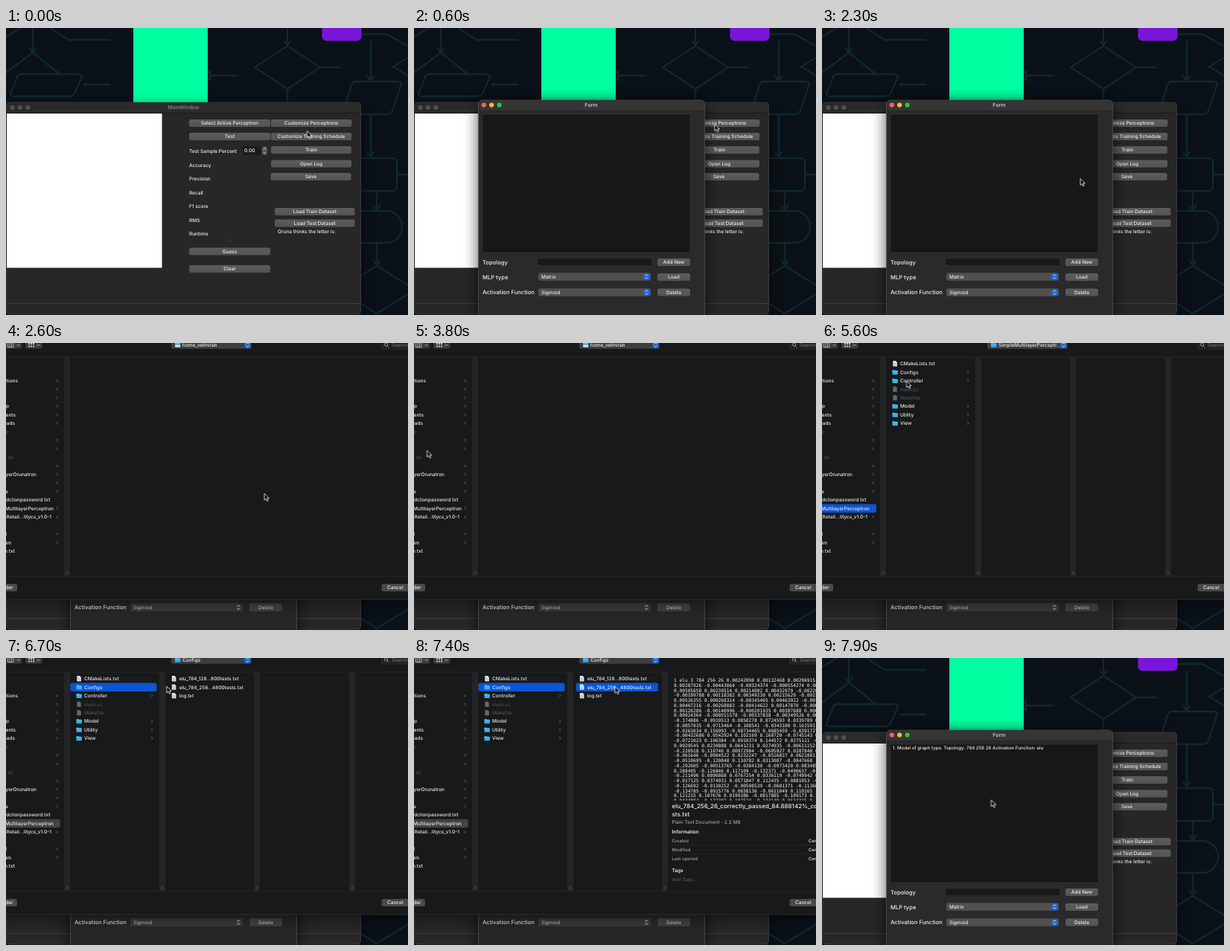
Write an HTML page that moves like this. It is 540 px wide and 386 px high and loops after 8 s.

```html
<!DOCTYPE html>
<html lang="en">
<head>
<meta charset="utf-8">
<title>Perceptron window</title>
<style>
html, body { margin: 0; width: 100%; height: 100%; overflow: hidden; background: #0a1118; }
svg { display: block; width: 540px; height: 386px; }
text { font-family: Inter, "Open Sans", sans-serif; font-weight: 500; text-rendering: geometricPrecision; white-space: pre; }
.mono { font-family: "DejaVu Sans Mono", monospace; font-weight: 400; }
.bold { font-weight: 600; }
.t { animation: 8s step-end infinite; }
#form { animation-name: form; }
#model { animation-name: model; }
#dialog { animation-name: dialog; }
.home { animation-name: home; }
.project { animation-name: project; }
.inside { animation-name: inside; }
.configs { animation-name: configs; }
.picked { animation-name: picked; }
.preview { animation-name: preview; }
.spare { animation-name: spare; }
@keyframes form { 0% { opacity: 0 } 4.375%, to { opacity: 1 } }
@keyframes model { 0% { opacity: 0 } 95.625%, to { opacity: 1 } }
@keyframes dialog { 0% { opacity: 0 } 30.625% { opacity: 1 } 95.625%, to { opacity: 0 } }
@keyframes home { 0% { opacity: 1 } 60%, to { opacity: 0 } }
@keyframes project { 0% { opacity: 0 } 60% { opacity: 1 } 73.75%, to { opacity: 0 } }
@keyframes inside { 0% { opacity: 0 } 60%, to { opacity: 1 } }
@keyframes configs { 0% { opacity: 0 } 73.75%, to { opacity: 1 } }
@keyframes picked { 0% { opacity: 0 } 89.375%, to { opacity: 1 } }
@keyframes preview { 0% { opacity: 0 } 91.25%, to { opacity: 1 } }
@keyframes spare { 0% { opacity: 0 } 60% { opacity: 1 } 91.25%, to { opacity: 0 } }
#cursor { animation: move 8s ease-in-out infinite; }
@keyframes move {
  0% { transform: translate(404.5px, 138.5px) }
  3.5%, 8.5% { transform: translate(404px, 129.5px) }
  11.25% { transform: translate(362px, 290px) }
  13.75%, 18.75% { transform: translate(344px, 331px) }
  24.5%, 33.75% { transform: translate(347px, 202.5px) }
  43.75% { transform: translate(20px, 90px) }
  47%, 48% { transform: translate(17.5px, 144.5px) }
  52.5% { transform: translate(8px, 185px) }
  56% { transform: translate(14px, 209px) }
  58.75%, 63% { transform: translate(16px, 217px) }
  70% { transform: translate(113.5px, 51px) }
  72.5%, 78.5% { transform: translate(118px, 37px) }
  87.5%, 93.5% { transform: translate(270px, 38.5px) }
  97.5%, to { transform: translate(227.3px, 190.8px) }
}
</style>
</head>
<body>
<svg viewBox="0 0 540 386">
  <defs>
    <filter id="blur" x="-20%" y="-20%" width="140%" height="140%"><feGaussianBlur stdDeviation="10"/></filter>
    <linearGradient id="face" x2="0" y2="1">
      <stop stop-color="#5c5c5c"/><stop offset="1" stop-color="#545454"/>
    </linearGradient>
    <clipPath id="numbers"><rect x="341" y="20" width="199" height="171.5"/></clipPath>
  </defs>

  <rect width="540" height="386" fill="#0a1118"/>
  <g fill="none" stroke="#11282c" stroke-width="2.3">
    <path d="M36 0V32M31 26L36 33L41 26M21 62H97Q104 62 101 68L92 88Q90 92 84 92H10Q4 92 7 86L15 66Q17 62 21 62Z"/>
    <path d="M36 33L72 62M36 33L0 60M0 12L20 0M104 76H140M60 0L84 16H140"/>
    <path d="M266 0V40M258 58L266 64L274 58V70L266 64L258 70ZM266 70V100M230 64H258M274 64H310"/>
    <path d="M378 0V22M373 17L378 23L383 17M378 24L422 53L378 82L334 53ZM378 82V100M422 53H450"/>
    <path d="M490 17V70M485 64L490 71L495 64M470 72H526Q532 72 530 78L519 111Q517 116 511 116H458Q451 116 454 110L464 77Q466 72 470 72Z"/>
    <path d="M477 8H510L540 24M540 40L520 52L540 64M490 116V172M485 166L490 173L495 166"/>
    <rect x="460" y="175" width="65" height="44" rx="5"/>
    <path d="M498 219V244M493 238L498 245L503 238M525 197H540"/>
    <rect x="450" y="246" width="82" height="43" rx="21"/>
    <path d="M498 289V318M493 312L498 319L503 312M498 320L550 352L498 384L446 352Z"/>
  </g>
  <rect x="171" y="0" width="100" height="100" fill="#00ffa0"/>
  <rect x="424.5" y="-20" width="53" height="37.3" rx="6" fill="#7a16dc"/>

  <g id="main"></g>
  <g id="form" class="t"></g>
  <g id="dialog" class="t"></g>
  <path id="cursor" d="M0 0V8.8L2.1 7L3.6 10.2L5.1 9.5L3.7 6.4H6.4Z" fill="#050505" stroke="#fff" stroke-width=".8" stroke-linejoin="round"/>
</svg>

<script>
const $ = id => document.getElementById(id);
const rect = (x, y, w, h, fill, rx = 0, more = '') =>
  `<rect x="${x}" y="${y}" width="${w}" height="${h}" rx="${rx}" fill="${fill}" ${more}/>`;
const shadow = (x, y, w, h, alpha) => rect(x, y + 4, w, h, '#000', 5, `opacity="${alpha}" filter="url(#blur)"`);
const line = (d, color, w = 1) => `<path d="${d}" fill="none" stroke="${color}" stroke-width="${w}"/>`;
// y is the vertical middle of the capitals
const text = (s, x, y, size = 6.5, fill = '#f0f0f0', more = '') =>
  `<text x="${x}" y="${y + size * .36}" font-size="${size}" fill="${fill}" ${more}>${s}</text>`;
const mid = 'text-anchor="middle"', end = 'text-anchor="end"', bold = 'class="bold"';
const group = (cls, inner) => `<g class="t ${cls}">${inner}</g>`;
const button = (s, x, y, w, fill = 'url(#face)', color = '#f0f0f0') =>
  rect(x, y - 5, w, 10, fill, 2.5) + text(s, x + w / 2, y, 6.5, color, mid);
const lights = (x, y, colors) =>
  colors.map((c, i) => `<circle cx="${x + i * 10.4}" cy="${y}" r="3.1" fill="${c}"/>`).join('');
const arrows = (x, y, fill) => rect(x, y - 4.3, 8.6, 8.6, fill, 2) +
  line(`M${x + 2.5} ${y - 1}l1.8 -1.9l1.8 1.9M${x + 2.5} ${y + 1}l1.8 1.9l1.8 -1.9`, '#f4f4f4', .9);

function drawMain() {
  const labels = ['Accuracy', 'Precision', 'Recall', 'F1 score', 'RMS', 'Runtime'];
  const buttons = [
    ['Select Active Perceptron', 246, 128, 109], ['Customize Perceptrons', 355.8, 128, 108.5],
    ['Test', 246, 146, 109], ['Customize Training Schedule', 355.8, 146, 108.5],
    ['Train', 356, 164, 108], ['Open Log', 356, 182.5, 108], ['Save', 355.5, 200, 108],
    ['Load Train Dataset', 361, 247, 107.5], ['Load Test Dataset', 361, 262.5, 107.5],
    ['Guess', 246, 300.5, 109], ['Clear', 246, 324, 109]
  ];
  $('main').innerHTML = shadow(1, 100, 475.5, 285, .35) +
    rect(1, 100, 475.5, 285, '#272727', 4, 'stroke="#48494a" stroke-width=".7"') +
    rect(1.4, 100.4, 474.7, 14, '#2b2b2c', 4) + line('M1 114.5H476', '#161616', .8) +
    lights(8.5, 107, ['#505052', '#505052', '#505052']) +
    text('MainWindow', 238.5, 107, 6.8, '#8c8c8c', mid) +
    rect(1, 115, 208.5, 207.5, '#fff') + line('M1 370.5H476', '#454545', .8) +
    buttons.map(b => button(...b)).join('') +
    text('Test Sample Percent', 246, 166) +
    labels.map((s, i) => text(s, 246, 184.6 + i * 18.45)).join('') +
    rect(318, 159.5, 24, 11, '#1b1b1b') + text('0.00', 320, 165, 6.6) +
    rect(344, 159, 6.8, 12, '#555', 3) +
    line('M345.7 163.4l1.7 -1.9l1.7 1.9M345.7 166.8l1.7 1.9l1.7 -1.9', '#eee', .8) +
    `<circle cx="300.5" cy="285.5" r="1.1" fill="#444"/>` +
    text('Oruna thinks the letter is:', 365, 273.5);
}

function drawForm() {
  const combo = (s, y) => rect(167, y - 5.2, 151, 10.4, '#505050', 2.5) +
    text(s, 171, y) + arrows(308, y, '#1667d8');
  $('form').innerHTML = shadow(86.5, 97, 304, 300, .7) +
    rect(86.5, 97, 304, 300, '#2a2a2a', 5, 'stroke="#5a5a5a" stroke-width=".7"') +
    rect(87, 97.4, 303, 14, '#353536', 5) + rect(87, 105, 303, 6.5, '#353536') +
    line('M87 111.3H390', '#1d1d1d', .7) +
    lights(93.8, 103.5, ['#ff5f57', '#febc2e', '#28c840']) +
    text('Form', 238, 103.5, 7, '#c6c6c6', mid + ' ' + bold) +
    rect(92, 116, 279, 186, '#171717', 0, 'stroke="#363636" stroke-width=".6"') +
    text('Topology', 92, 315, 7.6) + text('MLP type', 92, 335, 7.6) +
    text('Activation Function', 92, 355.5, 7.6) +
    rect(166, 310, 153.5, 9.5, '#191919', 0, 'stroke="#343434" stroke-width=".6"') +
    combo('Matrix', 334.5) + combo('Sigmoid', 355.5) +
    button('Add New', 327, 315, 44) + button('Load', 327, 335, 44) + button('Delete', 327, 355.5, 44) +
    `<g id="model" class="t">` +
    text('1. Model of graph type. Topology: 784 256 26 Activation Function: elu', 95, 121, 6.1) + '</g>';
}

const rowY = i => 27.8 + i * 11.45;
const DIM = '#505255', ICON = '#35aef0', PANEL = '#18191a';
const chevron = (x, i) => line(`M${x - .8} ${rowY(i) - 1.8}l1.7 1.8l-1.7 1.8`, '#77797c', .8);
const folder = (x, y) => rect(x, y - 3, 3.6, 2, ICON, .6) + rect(x, y - 2.2, 7.4, 5.4, ICON, .8) +
  line(`M${x} ${y - .9}h7.4`, '#7dd0fa', .6);
const file = (x, y, c = '#e4e4e4') =>
  `<path d="M${x + .8} ${y - 3.7}h3.8l1.8 1.8v5.5h-5.6z" fill="${c}"/>` +
  line(`M${x + 2} ${y - .6}h3M${x + 2} ${y + .9}h3M${x + 2} ${y + 2.3}h3`, '#8a8a8a', .4);
const pick = (x, i, w, fill = '#0b55d2') => rect(x, rowY(i) - 5.7, w, 11.4, fill, 2.5);
const bar = x => rect(x, 19.5, 8, 294, '#242525') +
  line(`M${x + 3.2} 307v4.5M${x + 5} 307v4.5`, '#5a5b5c', .6);

function homeList() {
  // end of the name, row, text, dimmed
  const names = [
    [16, 2, 'Applications'], [4, 5, 'Desktop'], [13, 6, 'Documents'], [12, 7, 'Downloads'],
    [4, 8, 'a.cc', 1], [10, 11, 'task.cc', 1], [41, 13, 'SimpleMultilayerOrunatron'], [3, 15, 'Pictures'],
    [59.5, 16, 'oldclionpassword.txt'], [64, 17, 'SimpleMultilayerPerceptron'],
    [61, 18, 'Retail...litycs_v1.0-1'], [1, 20, 'old'], [7, 21, 'vim'], [12, 22, 'main.txt']
  ];
  const dirs = [2, 3, 4, 5, 6, 7, 9, 10, 12, 13, 14, 15, 17, 18, 20, 21];
  return group('project', pick(-9, 17, 82)) + group('configs', pick(-9, 17, 82, '#414244')) +
    names.map(([x, i, s, dim]) => text(s, x, rowY(i), 6.5, dim ? DIM : '#ececec', end)).join('') +
    dirs.map(i => chevron(68.5, i)).join('');
}

function projectList() {
  const names = ['CMakeLists.txt', 'Configs', 'Controller', 'main.cc', 'Makefile', 'Model', 'Utility', 'View'];
  return group('configs', pick(86.5, 1, 116)) + names.map((s, i) => {
    const dim = i === 3 || i === 4, isFile = dim || i === 0, y = rowY(i);
    return (isFile ? file(94.5, y, dim ? '#606164' : undefined) : folder(94.5, y) + chevron(196, i)) +
      text(s, 105, y, 6.55, dim ? DIM : '#ececec');
  }).join('');
}

function configList() {
  const names = ['elu_784_128...800tests.txt', 'elu_784_256...4800tests.txt', 'log.txt'];
  return group('picked', pick(217.5, 1, 110.5)) +
    names.map((s, i) => file(222, rowY(i)) + text(s, 232.7, rowY(i), 6.45)).join('');
}

function weightLines() {
  const heads = ['0.00287926', '0.00505658', '-0.00109788', '0.00526355', '0.00407216', '0.00126286',
    '0.00924364', '-0.174886', '-0.0857035', '-0.0263034', '-0.00432686', '-0.0721023', '0.0929545',
    '-0.220918', '-0.061646', '-0.0510695', '-0.292605', '0.288495', '-0.211496', '-0.017125',
    '-0.126692', '-0.134785', '0.121215', '0.0434884'];
  let seed = 784;
  const rnd = () => (seed = seed * 16807 % 2147483647) / 2147483647;
  const lines = heads.map((head, i) => {
    let s = head;
    const scale = i < 7 ? .01 : .3;
    while (s.length < 54) s += ' ' + ((rnd() - .45) * scale).toPrecision(6);
    return s;
  });
  return ['1 elu 3 784 256 26 0.00242098 0.00132468 0.00296915 0.00', ...lines];
}

function preview() {
  const rows = weightLines().map((s, i) => text(s, 349, 30 + i * 6.75, 6.2, '#f6f6f6', 'class="mono"')).join('');
  const facts = ['Created', 'Modified', 'Last opened'].map((s, i) => {
    const y = 245.5 + i * 12;
    return text(s, 346.5, y, 5.9, '#a4a5a6') + text('Central', 530, y, 5.9, '#ececec') +
      (i < 2 ? line(`M346.5 ${y + 6}H540`, '#262729', .6) : '');
  }).join('');
  return rect(341, 19.5, 199, 294, PANEL) + `<g clip-path="url(#numbers)">${rows}</g>` +
    text('elu_784_256_26_correctly_passed_84.888142%_correct', 346.5, 199, 8) +
    text('sts.txt', 346.5, 210, 8) +
    text('Plain Text Document - 2.2 MB', 346.5, 221, 6.5, '#a0a1a2') +
    text('Information', 346.5, 233.5, 6.5, '#f0f0f0', bold) + facts +
    text('Tags', 346.5, 286, 6.5, '#f0f0f0', bold) +
    text('Add Tags...', 346.5, 297.5, 6.3, '#55575a');
}

function drawDialog() {
  const title = (cls, s) => group(cls, text(s, 237, 2.6));
  const down = x => line(`M${x - 1.7} 2l1.7 1.8l1.7 -1.8`, '#c8c8c8', .9);
  const grid = [0, 3, 6].map(x => rect(30 + x, 0, 2, 2, '#c8c8c8') + rect(30 + x, 3.4, 2, 2, '#c8c8c8')).join('');
  $('dialog').innerHTML =
    rect(87, 345, 303, 41, '#000', 0, 'opacity=".08"') +
    rect(167, 350.3, 151, 10.4, '#393939', 2.5) + text('Sigmoid', 171, 355.5, 6.5, '#b4b4b4') +
    arrows(308, 355.5, '#393939') + button('Delete', 327, 355.5, 44, '#414141', '#bdbdbd') +
    shadow(-20, -20, 580, 365, .5) +
    rect(-20, -20, 580, 365, PANEL, 0, 'stroke="#3c3d3f" stroke-width=".6"') +
    line('M0 19H540M0 314H540', '#2a2b2c', .8) +
    rect(-4, -4, 25, 11.5, '#3b3c3e', 2.5) + rect(26, -4, 22.5, 11.5, '#3b3c3e', 2.5) +
    line('M2.4 -1H10V5.6H2.4ZM5 -1V5.6M7.5 -1V5.6', '#c8c8c8', .8) + down(16.5) + grid + down(43.5) +
    rect(222, -4, 107.5, 11.8, '#3d3e40', 2.5) + arrows(320.2, 2.6, '#1667d8') +
    group('home', rect(227, -.8, 7.2, 6.4, '#58bdf2', 1) + rect(227, 3, 7.2, 2.6, '#d7e6ee', .8)) +
    group('inside', folder(227, 2.6)) +
    title('home', 'home_velmiran') + title('project', 'SimpleMultilayerPerceptr...') + title('configs', 'Configs') +
    rect(504.5, -4, 50, 12, '#202122', 2.5, 'stroke="#3a3b3c" stroke-width=".6"') +
    '<circle cx="510.6" cy="2" r="2.1" fill="none" stroke="#bbb" stroke-width=".8"/>' +
    line('M512.2 3.6l2 2', '#bbb', .8) + text('Search', 518, 2.6, 6.5, '#727477') +
    homeList() + bar(78) +
    group('inside', projectList() + bar(206) + bar(333)) +
    group('spare', bar(461)) + group('configs', configList()) + group('preview', preview()) +
    rect(-30, 324, 45, 10, '#48494b', 2.5) + text('New Folder', 9.5, 329, 6.5, '#f0f0f0', end) +
    rect(504.5, 324, 50, 10, '#48494b', 2.5) + text('Cancel', 512, 329);
}

drawMain();
drawForm();
drawDialog();
</script>
</body>
</html>
```
